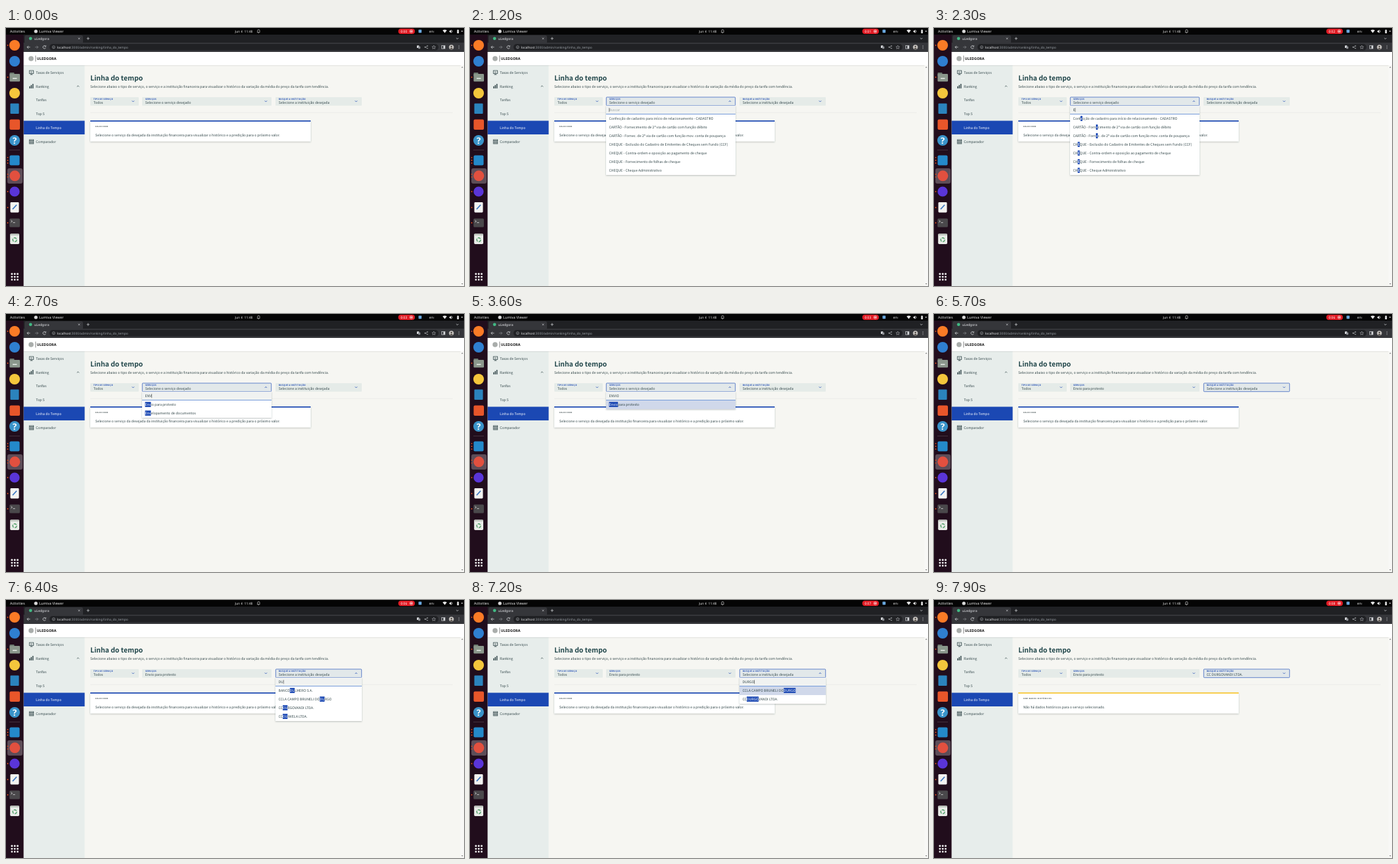
These frames come from a looping animation (690x388 px, 8 s). An HTML page:

```html
<!DOCTYPE html>
<html lang="pt">
<head>
<meta charset="utf-8">
<title>Linha do tempo</title>
<style>
  html, body { margin: 0; width: 100%; height: 100%; overflow: hidden; background: #f6f6f2; }
  svg { display: block; width: 100vw; height: 100vh; text-rendering: geometricPrecision; }
  .page { font-family: "Noto Sans CJK JP", "Noto Sans CJK SC", "Noto Sans CJK", "Noto Sans", sans-serif; }
  .sys { font-family: "Noto Sans", "Open Sans", sans-serif; }
  .logo { font-family: Inter, "Open Sans", sans-serif; font-weight: 700; }
  .bold { font-weight: 700; }
</style>
</head>
<body>
<svg id="stage" viewBox="0 0 690 388" xmlns="http://www.w3.org/2000/svg">
  <defs>
    <filter id="shadow" x="-10%" y="-20%" width="120%" height="150%">
      <feDropShadow dx="0" dy="1" stdDeviation="1.2" flood-color="#233" flood-opacity=".28"/>
    </filter>
  </defs>
  <g id="base"></g>
  <g id="live"></g>
</svg>
<script>
const LOOP = 8000;
const BLUE = '#1b48b3', INK = '#33474a', TEAL = '#23484c', BODY = 5.15;
const $ = id => document.getElementById(id);

const rect = (x, y, w, h, fill, more = '') =>
  `<rect x="${x}" y="${y}" width="${w}" height="${h}" fill="${fill}" ${more}/>`;
const circle = (x, y, r, fill, more = '') =>
  `<circle cx="${x}" cy="${y}" r="${r}" fill="${fill}" ${more}/>`;
const line = (d, color, w = .7, more = '') =>
  `<path d="${d}" fill="none" stroke="${color}" stroke-width="${w}" ${more}/>`;
const shape = (d, fill) => `<path d="${d}" fill="${fill}"/>`;
const text = (x, y, str, size = BODY, fill = INK, cls = 'page', more = '') =>
  `<text x="${x}" y="${y}" font-size="${size}" fill="${fill}" class="${cls}" ${more}>${str}</text>`;
const chevron = (x, y, up, color = BLUE) => {
  const d = up ? -.8 : .8;
  return line(`M${x - 1.6} ${y - d}L${x} ${y + d}L${x + 1.6} ${y - d}`, color, .8);
};

// ---- desktop ----
function topBar() {
  const w = '#e8e8e8';
  return rect(0, 0, 690, 10, '#050505') +
    text(6, 6.7, 'Activities', 5.4, w, 'sys') +
    circle(45, 5, 2.6, '#d8d8d8') + text(50, 6.7, 'Lumiva Viewer', 5.4, w, 'sys') +
    text(345, 6.7, 'Jun 4&#160; 11:48', 4.9, w, 'sys') +
    line('M379 6.6V4a1.6 1.6 0 0 1 3.2 0V6.6H378.4M380.1 7.6h1', w, .6) +
    rect(591, 1, 25, 8, '#e01b24', 'rx="4"') +
    circle(610.5, 5, 2.2, 'none', 'stroke="#fff" stroke-width=".6"') + rect(609.6, 4.1, 1.8, 1.8, '#fff') +
    rect(621.5, 2.5, 4.6, 4.8, '#69a7de', 'rx=".8"') +
    text(637.5, 6.7, 'en', 5.2, w, 'sys') + text(643.6, 7.4, '1', 3.4, w, 'sys') +
    shape('M657.8 3.6q3.2-2.4 6.4 0L661 7.6z', w) +
    shape('M668 4h1.3l1.7-1.6v5.4l-1.7-1.6H668z', w) + line('M672 3.3q1.3 1.7 0 3.4', w, .6) +
    rect(679.6, 3, 2.6, 5, w, 'rx=".5"') + rect(680.3, 2.3, 1.2, 1, w) +
    shape('M685.5 4.3h3l-1.5 1.8z', w);
}

function browserBar() {
  const g = '#d5d7da';
  return rect(26, 10, 664, 12, '#202124') + rect(28, 11, 88, 12, '#35363a', 'rx="2.5"') +
    rect(26, 22, 664, 14, '#35363a') +
    circle(37, 15.8, 2.4, '#41b883') +
    text(42.5, 17.5, 'uLedgora', 5, '#e8eaed', 'sys') +
    line('M108.8 14.5l2.6 2.6m0-2.6l-2.6 2.6', g, .6) +
    line('M121.6 15.8h4.2m-2.1-2.1v4.2', g, .7) + chevron(680, 15.8, false, g) +
    line('M36.4 28.8h-4.6m2.1-2.1l-2.1 2.1l2.1 2.1', '#e4e6e8') +
    line('M43.8 28.8h4.6m-2.1-2.1l2.1 2.1l-2.1 2.1', '#8a8c90') +
    line('M59.7 27.6a2.2 2.2 0 1 0 .2 2M60 26.2v1.7h-1.7', '#e4e6e8') +
    rect(65.5, 24, 586, 9.6, '#202124', 'rx="4.8"') +
    circle(71.8, 28.8, 2, 'none', 'stroke="#b5b8bc" stroke-width=".6"') + rect(71.5, 28.5, .6, 1.4, '#b5b8bc') +
    text(77, 30.5, 'localhost<tspan fill="#9aa0a6">:3000/admin/ranking/linha_do_tempo</tspan>', 4.87, '#e8eaed', 'sys') +
    rect(619, 26.3, 3.4, 3.6, g, 'rx=".5"') + rect(621.2, 27.8, 3, 3.4, '#8d9095', 'rx=".5"') +
    line('M631.4 28.8l3.4-1.7m-3.4 1.7l3.4 1.7', g, .5) +
    [[631.2, 28.8], [635, 27], [635, 30.6]].map(p => circle(...p, .7, g)).join('') +
    line('M644.5 26.2l.8 1.7 1.9.2-1.4 1.3.4 1.9-1.7-.9-1.7.9.4-1.9-1.4-1.3 1.9-.2z', g, .5) +
    rect(656.6, 26.6, 4.6, 4.4, 'none', `stroke="${g}" stroke-width=".7"`) + rect(659, 26.6, 2.2, 4.4, g) +
    circle(671, 28.8, 3.6, '#c9c6c2') + circle(671, 28, 1.3, '#5b5550') +
    shape('M668.6 31.4q2.4-3.4 4.8 0q-2.4 1.6-4.8 0', '#5b5550') +
    [26.8, 28.8, 30.8].map(y => circle(682.3, y, .55, g)).join('');
}

function dock() {
  const dots = [[26, 1], [74, 1], [199, 3], [222, 2], [246, 1], [270, 1], [293, 1]];
  let s = rect(0, 10, 26.5, 378, '#210d1c') + rect(2, 211, 23, 23, '#5d4d58', 'rx="3"');
  for (const [y, n] of dots)
    for (let i = 0; i < n; i++) s += circle(2.6, y + (i - (n - 1) / 2) * 4.2, .9, '#e95420');
  s += circle(13, 26, 8, '#fb7b26') + circle(13, 50, 8, '#2f7fd0') +
    rect(5.5, 67, 7, 5, '#6d7a70', 'rx="1"') + rect(5.5, 69, 15.5, 11.5, '#8b978c', 'rx="1.2"') +
    rect(10, 75, 6.5, 1.6, '#e6ebe6', 'rx=".5"') +
    circle(13, 98, 8, '#f4c63c') + rect(6.5, 113.5, 13, 15.5, '#2b83bd', 'rx="1"') +
    rect(5.5, 137.5, 15.5, 15.5, '#e8562a', 'rx="2"') +
    circle(13, 169, 8, '#3a93c9') + text(13, 173.8, '?', 13, '#fff', 'sys bold', 'text-anchor="middle"') +
    line('M5 183.5H21', '#5c4a57', .6) +
    rect(5.5, 191.5, 15, 15, '#2489ca', 'rx="2"') + circle(13.3, 222.3, 8, '#e2503f') +
    circle(13, 246, 7.6, '#5a35d8') +
    rect(6.5, 262, 13, 15.5, '#f3f3f1', 'rx="1.4"') + line('M10 272.5l6-6.5', '#3d77c2', 1.8) +
    rect(5.3, 286.5, 15.6, 13, '#4a484b', 'rx="1.6"') + line('M7.6 289.2l1.8 1.5-1.8 1.5M10.6 292.7h3', '#eee', .8) +
    rect(6.2, 309.5, 13.8, 15.5, '#e9ece8', 'rx="1.8"') + rect(6.2, 309.5, 13.8, 2.4, '#c4cac3', 'rx="1"') +
    circle(13.1, 318.4, 2.9, 'none', 'stroke="#4a9c63" stroke-width="1.3" stroke-dasharray="4.4 1.6"');
  for (let i = 0; i < 9; i++)
    s += rect(7.6 + i % 3 * 4.3, 368.6 + (i / 3 | 0) * 4.3, 2.6, 2.6, '#f2f2f2', 'rx=".7"');
  return s;
}

// ---- static part of the page ----
function sidebar() {
  const items = [['Taxas de Serviços', 67], ['Ranking', 87.6], ['Tarifas', 108.4], ['Top 5', 129.3],
    ['Linha do Tempo', 150.1], ['Comparador', 171]];
  return rect(26.5, 56, 92, 332, '#e7edeb') + rect(26.5, 139.5, 92, 20.5, BLUE) +
    items.map(([s, y], i) => text(45, y + 1.9, s, BODY, i == 4 ? '#fff' : INK)).join('') +
    rect(35.2, 64, 6.2, 4.4, 'none', `stroke="${INK}" stroke-width=".8"`) +
    line('M36.4 70h3.8M38.3 68.4v1.6M36.8 66.3h3', INK, .8) +
    rect(35, 87.6, 1.5, 3.2, INK) + rect(37.4, 85.8, 1.5, 5, INK) + rect(39.8, 84, 1.5, 6.8, INK) +
    rect(35.2, 168, 6.4, 6, 'none', `stroke="${INK}" stroke-width=".8"`) +
    line('M35 169.5h6.8M35 171.9h6.8M37.3 169v5M39.5 169v5', INK, .7) +
    chevron(108.5, 87.6, true, INK);
}

function page() {
  return rect(26.5, 36, 663.5, 352, '#f6f6f2') + sidebar() +
    rect(26.5, 56, 663.5, 1.2, '#000', 'opacity=".07"') + rect(26.5, 36, 663.5, 20, '#fff') +
    circle(37.8, 46, 3.8, '#a9adab') + line('M44.7 41.5v9', '#444', .6) +
    text(46.6, 47.9, 'ULEDGORA', 5.3, '#161616', 'logo') +
    rect(684.6, 56, 5.4, 332, '#f8f8f6') + shape('M686 59.8h2.6l-1.3-1.8z', '#777') +
    shape('M686 384h2.6l-1.3 1.8z', '#777') +
    text(127, 78.9, 'Linha do tempo', 10.3, TEAL, 'page bold') +
    text(127, 89.8, 'Selecione abaixo o tipo de serviço, o serviço e a instituição financeira para visualizar ' +
      'o histórico da variação da média do preço da tarifa com tendência.') +
    line('M127 127.3H673', '#e4e5e0', .6);
}

// ---- live part ----
const fields = [
  { x: 127, w: 73, label: 'TIPO DE SERVIÇO' },
  { x: 205, w: 195, label: 'SERVIÇOS', options: [
    'Confecção de cadastro para início de relacionamento - CADASTRO',
    'CARTÃO - Fornecimento de 2ª via de cartão com função débito',
    'CARTÃO - Fornec. de 2ª via de cartão com função mov. conta de poupança',
    'CHEQUE - Exclusão do Cadastro de Emitentes de Cheques sem Fundo (CCF)',
    'CHEQUE - Contra-ordem e oposição ao pagamento de cheque',
    'CHEQUE - Fornecimento de folhas de cheque',
    'CHEQUE - Cheque Administrativo',
    'Envio para protesto',
    'Envelopamento de documentos'] },
  { x: 406, w: 130, label: 'BUSQUE A INSTITUIÇÃO', options: [
    'BANCO ORVIDA S.A.',
    'BANCO DULMERO S.A.',
    'CCLA VALE QUIRANO',
    'CCLA CAMPO BRUNELI DO DURGO',
    'CC DURGOVANDI LTDA.',
    'CC SERVANDIL LTDA.',
    'CC DUNVELA LTDA.',
    'FINANCEIRA TOLVIDRA'] }
];

const typing = [[1200, ''], [2300, 'E'], [2400, 'EN'], [2700, 'ENV'], [2900, 'ENVI'], [3100, 'ENVIO'],
  [6000, ''], [6300, 'D'], [6400, 'DU'], [6500, 'DUR'], [6600, 'DURG'], [6800, 'DURGO']];

function stateAt(t) {
  const [since, query] = typing.filter(k => k[0] <= t).pop() || [0, ''];
  let hover = -1;
  if (t >= 3600 && t < 4200) hover = 0;
  if (t >= 7200) hover = t < 7400 ? 0 : 1;
  return {
    secs: Math.floor((t + 300) / 1000),
    focus: t < 1200 ? 0 : t < 4900 ? 1 : 2,
    open: t >= 1200 && t < 4200 ? 1 : t >= 6000 && t < 7900 ? 2 : 0,
    caret: (t - since) % 1000 < 500,
    query, hover,
    values: ['Todos',
      t < 4200 ? 'Selecione o serviço desejado' : 'Envio para protesto',
      t < 7900 ? 'Selecione a instituição desejada' : 'CC DURGOVANDI LTDA.'],
    empty: t >= 7900
  };
}

function card(empty) {
  return rect(127, 139, 332, 31.6, '#fff', 'filter="url(#shadow)" rx=".6"') +
    rect(127, 139, 332, 1.7, empty ? '#f8c834' : BLUE) +
    text(134.5, 149.4, empty ? 'SEM DADOS HISTÓRICOS' : 'SELECIONE', 2.57, '#1f2f31', 'page bold', 'letter-spacing=".6"') +
    text(134.5, 162.6, empty ? 'Não há dados históricos para o serviço selecionado.' :
      'Selecione o serviço da desejada da instituição financeira para visualizar o histórico e a predição para o próximo valor.');
}

function field({ x, w, label }, i, s) {
  const on = i && s.focus == i;
  return rect(x, 104, w, 12.8, on ? '#e2e8ea' : '#e5ebe8', 'rx="1"') +
    (on ? rect(x + .3, 104, w - .6, 12.7, 'none', 'rx="1" stroke="#3f68c0" stroke-width=".8"') : '') +
    text(x + 4.7, 107.6, label, 3.21, BLUE, 'page bold', 'letter-spacing=".18"') +
    text(x + 4.7, 114.2, s.values[i]) +
    chevron(x + w - 8.5, 110.2, s.open == i && i > 0);
}

const probe = document.createElementNS('http://www.w3.org/2000/svg', 'text');
probe.setAttribute('class', 'page');
probe.setAttribute('font-size', BODY);
probe.setAttribute('visibility', 'hidden');
$('stage').append(probe);
const widthOf = str => {
  probe.textContent = str;
  return str ? probe.getComputedTextLength() : 0;
};

// The match splits the option in three trimmed pieces.
function option(str, x, y, query) {
  const at = str.toUpperCase().indexOf(query);
  if (!query) return text(x, y, str);
  const end = at + query.length;
  const [a, b, c] = [str.slice(0, at), str.slice(at, end), str.slice(end)].map(p => p.trim());
  const xb = x + widthOf(a), wb = widthOf(b);
  return text(x, y, a) + rect(xb, y - 5.8, wb, 7.7, BLUE) +
    text(xb, y, b, BODY, '#fff') + text(xb + wb, y, c);
}

function menu({ x, w, options }, s) {
  const rows = options.filter(o => o.toUpperCase().includes(s.query)).slice(0, 7);
  const tx = x + 4.5;
  let out = rect(x, 116.8, w, 13.2 + rows.length * 13, '#fff', 'filter="url(#shadow)"') +
    rect(x, 117.2, w, 12.4, '#f0f2f1') + line(`M${x} 129.5h${w}`, '#3f76cf', .7) +
    text(tx, 125, s.query || 'Buscar', BODY, s.query ? INK : '#9aa3a5');
  if (s.caret) out += rect(tx + widthOf(s.query) + .1, 120.2, .5, 6, '#222');
  rows.forEach((o, i) => {
    if (i == s.hover) out += rect(x, 130 + i * 13, w, 13, '#d0d8ea');
    out += option(o, tx, 138 + i * 13, s.query);
  });
  return out;
}

let shown = '';
function draw(t) {
  const s = stateAt(t), key = JSON.stringify(s);
  if (key == shown) return;
  shown = key;
  $('live').innerHTML = text(594.5, 6.7, '0:0' + s.secs, 4.9, '#fff', 'sys') + card(s.empty) +
    fields.map((f, i) => field(f, i, s)).join('') + (s.open ? menu(fields[s.open], s) : '');
}

$('base').innerHTML = page() + browserBar() + dock() + topBar();
const start = performance.now();
function tick() {
  draw((performance.now() - start) % LOOP);
  requestAnimationFrame(tick);
}
tick();
</script>
</body>
</html>
```
